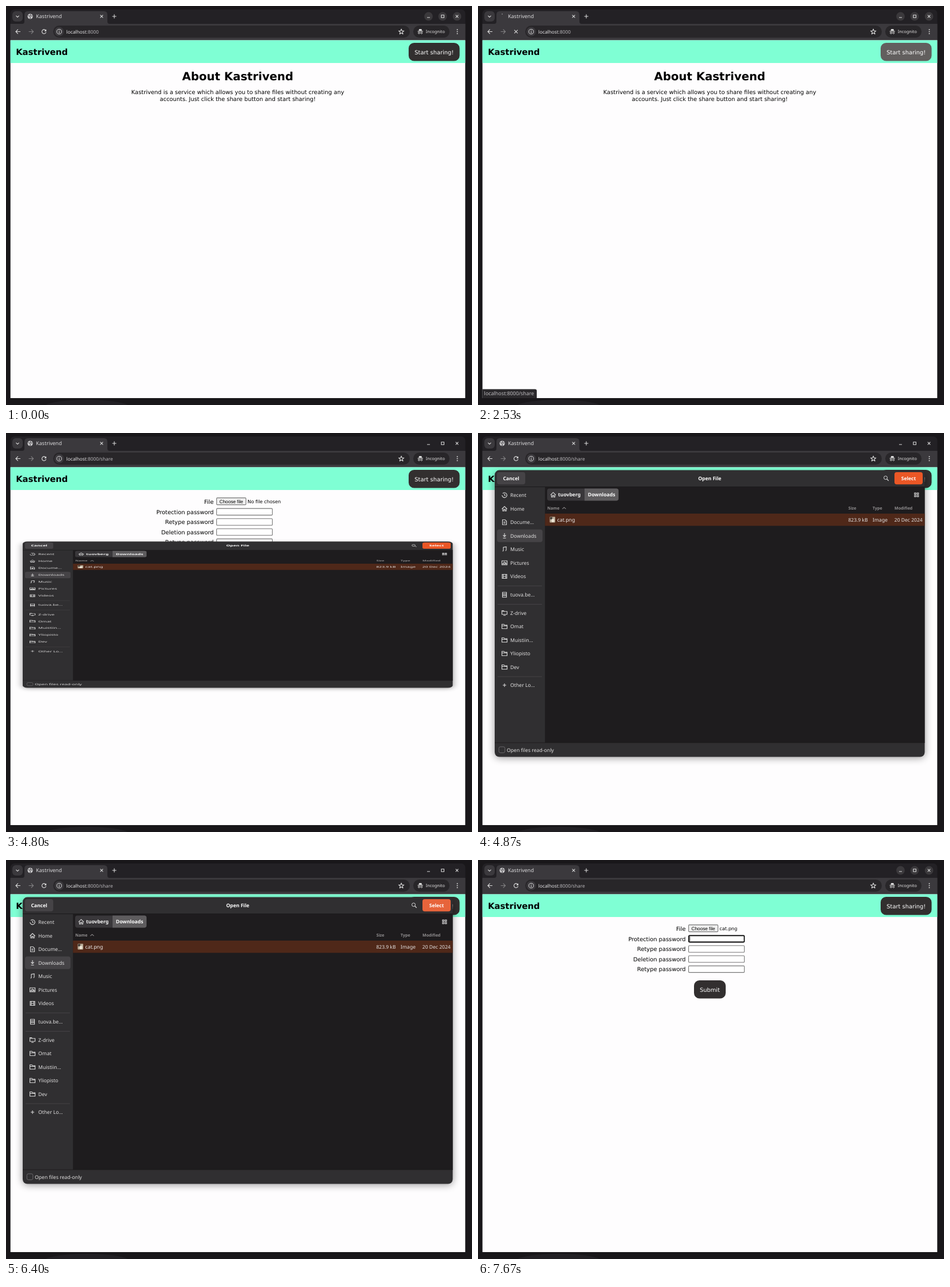
Write an HTML page that moves like this. It is 809 by 693 pixels and loops after 8000 ms.

```html
<!DOCTYPE html>
<html lang="en">
<head>
<meta charset="utf-8">
<title>File sharing demo</title>
<style>
  html, body { margin: 0; width: 100%; height: 100%; overflow: hidden; background: #19171a; }
  svg { display: block; width: 809px; height: 693px; }
  text { font: 9.85px "DejaVu Sans", sans-serif; text-rendering: geometricPrecision; white-space: pre; }
  .ui { font-family: "Noto Sans", "Open Sans", sans-serif; }
  .b { font-weight: 700; }
  .line { fill: none; stroke: #dcdcdc; stroke-width: 1.1; }
</style>
</head>
<body>
<svg id="stage" viewBox="0 0 809 693" xmlns="http://www.w3.org/2000/svg"></svg>
<script>
const LOOP = 8000, FRAME = 1000 / 15;
const BRAND = 'Kastrivend', USER = 'tuovberg', HOST = 'tuova.be…';

// ---- markup helpers ----
const rect = (x, y, w, h, fill, r = 0, more = '') =>
  `<rect x="${x}" y="${y}" width="${w}" height="${h}" rx="${r}" fill="${fill}" ${more}/>`;
const circle = (x, y, r, fill, more = '') => `<circle cx="${x}" cy="${y}" r="${r}" fill="${fill}" ${more}/>`;
const group = (id, body, more = '') => `<g id="${id}" ${more}>${body}</g>`;
const line = (d, more = '') => `<path class="line" d="${d}" ${more}/>`;
const at = (x, y, body) => `<g transform="translate(${x} ${y})">${body}</g>`;
const text = (x, y, str, size, fill = '#000', cls = '', anchor = 'start') =>
  `<text x="${x}" y="${y}" class="${cls}" fill="${fill}" text-anchor="${anchor}" style="font-size:${size}px">${str}</text>`;
const ui = (x, y, str, size = 8.7, fill = '#e2e1e1', cls = '', anchor) =>
  text(x, y, str, size, fill, 'ui ' + cls, anchor);
const cross = (x, y, r) => line(`M${x - r} ${y - r}l${2 * r} ${2 * r}m0 ${-2 * r}l${-2 * r} ${2 * r}`);
const darkButton = (id, x, y, w, label) =>
  rect(x, y, w, 31.5, '#322f2f', 9.5, `id="${id}"`) +
  text(x + w / 2, y + 19.8, label, 9.85, '#fff', '', 'middle');

// ---- browser window ----
function browser() {
  const arrow = 'M4-0H-4m3.8-3.8L-4 0l3.8 3.8';
  const star = Array.from({ length: 10 }, (_, i) => {
    const a = i * Math.PI / 5, r = i % 2 ? 2 : 4.8;
    return `${(r * Math.sin(a)).toFixed(2)} ${(-r * Math.cos(a)).toFixed(2)}`;
  }).join('L');
  return rect(0, 0, 809, 693, '#19171a') +
    '<ellipse cx="140" cy="697" rx="75" ry="13" fill="#222024"/>' +
    rect(7.5, 6, 790, 100, '#232125', 7) +
    rect(11, 9, 18, 18, '#3b393d', 6) + line('M17.4 16.8l2.6 2.6 2.6-2.6') +
    '<path d="M28 31q4 0 4-4V15q0-6 6-6H170q6 0 6 6V27q0 4 4 4z" fill="#3b393d"/>' +
    group('favicon', circle(42, 18, 4.6, '#c9c8ca') +
      '<path d="M38.5 16.5l3 1.5 1 3-1.5 1.3M43 14l-1 2 2 1.500 2-.5" fill="none" stroke="#5b595d" stroke-width="1.2"/>') +
    circle(42, 14, 0.7, '#c9c8ca', 'id="spinner"') +
    ui(52, 21.2, BRAND, 9, '#dddcde') +
    cross(166, 18, 2.4) + line('M184.500 18h7m-3.500-3.500v7') +
    group('controls', [733.5, 758, 783].map(x => circle(x, 18, 7.4, '#3b393c')).join('')) +
    line('M731 20h5M755.800 15.700h4.600v4.600h-4.600z') + cross(783, 18, 2.3) +
    rect(7.5, 31, 790, 29, '#3b393d') +
    at(21, 44.5, line(arrow)) + at(43.5, 44.5, `<g transform="scale(-1 1)" opacity=".45">${line(arrow)}</g>`) +
    group('reload', line('M69 42.500a3.600 3.600 0 1 0 .5 2.800') + '<path d="M70 40.500v3.500h-3.500z" fill="#dcdcdc"/>') +
    group('stop', cross(66, 44.5, 2.9)) +
    rect(82, 34, 619, 21, '#282629', 10.5) + circle(92.3, 44.5, 8, '#3b393d') +
    circle(92.3, 44.5, 4.1, 'none', 'stroke="#dcdcdc"') + line('M92.300 42v1m0 1v3') +
    ui(104.8, 47.6, 'localhost<tspan fill="#b9b7bb">:8000<tspan id="path">/share</tspan></tspan>', 8.27, '#e8e7e9') +
    at(686.3, 44.8, line(`M${star}Z`, 'stroke-linejoin="round"')) +
    rect(707, 34, 63, 21, '#282629', 10.5) +
    '<path d="M714.500 43.600h9.500v1h-9.500zM716.300 43l1-3h4l1 3z" fill="#dcdcdc"/>' +
    circle(717, 46.8, 1.4, 'none', 'stroke="#dcdcdc"') + circle(721.4, 46.8, 1.4, 'none', 'stroke="#dcdcdc"') +
    ui(728.7, 47.3, 'Incognito', 7.4) +
    [41, 44.5, 48].map(y => circle(783.5, y, 0.95, '#dcdcdc')).join('');
}

// ---- web pages ----
function pages() {
  const labels = ['File', 'Protection password', 'Retype password', 'Deletion password', 'Retype password'];
  const rowY = i => i ? 123 + 17.65 * (i - 1) + 17.5 : 122.5;
  const fields = [0, 1, 2, 3].map(i =>
    rect(365.6, 131.1 + 17.6 * i, 96.8, 11.5, '#fff', 1.3, `id="field${i}" stroke="#767676" stroke-width="1.1"`)).join('');
  return rect(7.5, 59.5, 790, 621.5, '#fefdfe') + rect(7.5, 59.5, 790, 39.5, '#7fffd4') +
    text(17.2, 85.3, BRAND, 14.75, '#000', 'b') +
    darkButton('start', 699, 64, 88.5, 'Start sharing!') +
    group('about',
      text(402.3, 129, 'About ' + BRAND, 19.65, '#000', 'b', 'middle') +
      text(402.3, 153, BRAND + ' is a service which allows you to share files without creating any', 9.85, '#000', '', 'middle') +
      text(402.3, 165, 'accounts. Just click the share button and start sharing!', 9.85, '#000', '', 'middle')) +
    group('share',
      labels.map((s, i) => text(360.6, rowY(i), s, 9.85, '#000', '', 'end')).join('') +
      rect(365.6, 112.6, 51, 12, '#efefef', 1.3, 'id="choose" stroke="#767676" stroke-width="1.1"') +
      '<text x="391.1" y="121.600" text-anchor="middle" style="font:8.2px \'Liberation Sans\',Arial,sans-serif">Choose file</text>' +
      text(419.3, 121.8, '', 8.2).replace('<text', '<text id="chosen"') + fields +
      group('focus', rect(366, 131.4, 96.3, 11.1, '#fff', 1.5, 'stroke="#101010" stroke-width="1.800"') +
        rect(367.6, 132.8, 0.7, 8.2, '#000')) +
      darkButton('submit', 375, 209, 55, 'Submit')) +
    group('tooltip', rect(399, 129.5, 77, 23, '#252426', 5) + ui(437.5, 144.2, 'No file chosen', 8.7, '#fff', '', 'middle')) +
    group('status', '<path d="M7.500 681v-15.500h91.500q3 0 3 3v12.500z" fill="#2b292c"/>' +
      ui(10.6, 676.3, 'localhost:8000/share', 8.9, '#bdbbbe'));
}

// ---- file dialog ----
const icons = {
  recent: 'M-3-3a4.200 4.200 0 1 1-1.200 3M0-2.500v2.800h2',
  home: 'M-4.500 .5L0-4l4.500 4.500M-3 0v4h2v-3h2v3h2v-4',
  doc: 'M-3.500-4.200h4.500l2.500 2.500v6h-7zM-1.800-.5h3.500m-3.500 2h3.500',
  down: 'M0-4.500v6m-2.500-2.500L0 1.500l2.500-2.500M-2.500 4h5',
  music: 'M-2 3v-6.500l5-.8v6M-3.500 3h1.500M1.500 2.200h1.500',
  pic: 'M-4.500-3.500h9v7h-9zM-3 2l2.500-3.500 1.500 2 1-1L3 2z',
  video: 'M-4-3.500h8v7h-8zM-2.200-3.500v7m4.400-7v7M-2.200 0h4.400',
  server: 'M-3.500-4.200h7v8.400h-7zM-3.500-1.400h7m-7 2.800h7',
  drive: 'M-4.500-2.500h9v5h-9zM-4.500-2.500v-1.500h3l1 1.500M-2 4.300h4',
  folder: 'M-4.500-3.800h3.500l1 1.500h4.500v6h-9zM-4.500-1h9',
  plus: 'M-3 0h6m-3-3v6',
};
const places = [
  ['recent', 'Recent', 108], ['home', 'Home', 131.5], ['doc', 'Docume…', 155], ['down', 'Downloads', 178.5],
  ['music', 'Music', 202], ['pic', 'Pictures', 225.5], ['video', 'Videos', 249], ['server', HOST, 281],
  ['drive', 'Z-drive', 312.5], ['folder', 'Omat', 336], ['folder', 'Muistiin…', 359.5],
  ['folder', 'Yliopisto', 383], ['folder', 'Dev', 406.5], ['plus', 'Other Lo…', 438],
];

function dialog() {
  const icon = (name, x, y) => at(x, y, line(icons[name], 'stroke-width=".9"'));
  const column = (x, s) => ui(x, 132.8, s, 7.1, '#918f90', 'b');
  return group('dialog',
    rect(29, 70, 746.5, 494, '#000', 8, 'opacity=".42" filter="url(#blur)"') +
    rect(29, 64.6, 746.5, 498, '#302f31', 8) +
    rect(116.3, 94, 659.2, 444, '#1e1c1e') +
    rect(29, 93, 746.5, 1, '#1b1a1b') + rect(29, 537.5, 746.5, 0.8, '#1b1a1b') +
    rect(33, 68, 49, 21.3, '#454346', 4) + ui(57.5, 81.8, 'Cancel', 8.5, '#fff', 'b', 'middle') +
    ui(402.3, 81.8, 'Open File', 8.6, '#fff', 'b', 'middle') +
    circle(707.6, 77.7, 3, 'none', 'stroke="#dcdcdc"') + line('M709.800 80l3 3') +
    rect(723, 68, 49, 21.3, '#eb5726', 4) + rect(723, 68, 49, 21.3, '#d98a78', 4, 'id="selectHover"') +
    ui(747.4, 81.8, 'Select', 8.5, '#fff', 'b', 'middle') +
    rect(33, 167.5, 79, 22, '#454346', 4) +
    places.map(([name, label, y]) => icon(name, 46, y) + ui(56, y + 3.1, label)).join('') +
    [265.3, 297, 422.7].map(y => rect(34, y, 77, 0.8, '#4a484b')).join('') +
    rect(120, 96.5, 124, 21, '#39373a', 4) +
    '<path d="M185 96.500h55q4 0 4 4v13q0 4-4 4h-55z" fill="#5e5c5e"/>' +
    icon('home', 130.5, 107.2) + ui(139, 110.2, USER, 8.6, '#f4f4f4', 'b') + ui(190.8, 110.2, 'Downloads', 8.6, '#fff', 'b') +
    line('M757.800 104h2.500v2.500h-2.500zm4.500 0h2.500v2.500h-2.500zm0 4.300h2.500v2.500h-2.500zm-4.500 0h2.500v2.500h-2.500z', 'stroke-width=".9"') +
    column(120.3, 'Name') + column(643, 'Size') + column(685, 'Type') + column(723, 'Modified') +
    line('M146.500 131.800l3-2.600 3 2.600', 'style="stroke:#918f90"') +
    rect(116.3, 140, 659.2, 21.2, '#4f2819') +
    rect(116.3, 140, 659.2, 21.2, '#fff', 0, 'id="rowHover"') +
    rect(124.5, 145.5, 9.5, 10, '#b9ac98', 1) + rect(125, 146, 4, 4, '#4c463e') +
    '<ellipse cx="130" cy="152" rx="2.400" ry="3" fill="#eee5d6"/>' +
    ui(137.5, 153.8, 'cat.png', 8.8, '#f0eeee') + ui(642.7, 153.8, '823.9 kB', 8.5) +
    ui(685, 153.8, 'Image', 8.7) + ui(722.8, 153.8, '20 Dec 2024', 8.55) +
    rect(36.3, 545, 10.4, 10.4, '#302f31', 2.5, 'stroke="#69676a"') + ui(50, 553.5, 'Open files read-only', 8.66));
}

const stage = document.getElementById('stage');
stage.innerHTML =
  '<defs><filter id="blur" x="-10%" y="-10%" width="120%" height="120%"><feGaussianBlur stdDeviation="7"/></filter>' +
  '<clipPath id="inside"><rect x="7.500" y="6" width="790" height="675"/></clipPath></defs>' +
  browser() + `<g clip-path="url(#inside)">${pages()}${dialog()}</g>`;

// ---- timeline ----
const el = id => document.getElementById(id);
const show = (id, amount) => {
  el(id).style.display = amount > 0 ? '' : 'none';
  el(id).style.opacity = Number(amount);
};
const ramp = (t, a, b) => Math.min(1, Math.max(0, (t - a) / (b - a)));
const during = (t, a, b) => t >= a && t < b;
const pulse = (t, a, b, c, d) => ramp(t, a, b) - ramp(t, c, d);
const easeOut = p => 1 - (1 - p) ** 2;
const DIALOG_MIDDLE = 317.5;

function render(t) {
  const loading = during(t, 2530, 2600), shared = t >= 2600, picked = t >= 6530;
  show('favicon', !loading);
  show('reload', !loading);
  show('spinner', loading);
  show('stop', loading);
  show('path', shared);
  show('about', !shared);
  show('share', shared);
  show('controls', !during(t, 4800, 6530));

  const startHover = during(t, 1470, 3130) || during(t, 6530, 6870);
  el('start').setAttribute('fill', startHover ? '#625f5e' : '#322f2f');
  show('status', pulse(t, 1660, 1800, 3400, 3670) + pulse(t, 6600, 6730, 7070, 7330));

  const pressed = during(t, 4530, 4600), over = during(t, 3470, 4800);
  el('choose').setAttribute('fill', pressed ? '#f5f5f5' : over ? '#e5e5e5' : '#efefef');
  el('choose').setAttribute('stroke', pressed ? '#8d8d8d' : over ? '#4f4f4f' : '#767676');
  el('chosen').textContent = picked ? 'cat.png' : 'No file chosen';
  el('field0').setAttribute('stroke', during(t, 3330, 3470) || t >= 7330 ? '#4f4f4f' : '#767676');
  show('focus', t >= 7600);
  show('tooltip', during(t, 4330, 4530));

  const scale = easeOut(ramp(t, 4770, 4870)) * (1 - ramp(t, 6480, 6580)) ** 2;
  show('dialog', scale > 0);
  el('dialog').setAttribute('transform', `translate(0 ${DIALOG_MIDDLE * (1 - scale)}) scale(1 ${scale})`);
  show('rowHover', 0.06 * pulse(t, 5070, 5270, 5530, 5730));
  show('selectHover', 0.25 * ramp(t, 5730, 5930));
}

function tick(now) {
  const frame = Math.floor((now % LOOP + 5) / FRAME);
  render(Math.round(frame * FRAME / 10) * 10);
  requestAnimationFrame(tick);
}
render(0);
requestAnimationFrame(tick);
</script>
</body>
</html>
```
